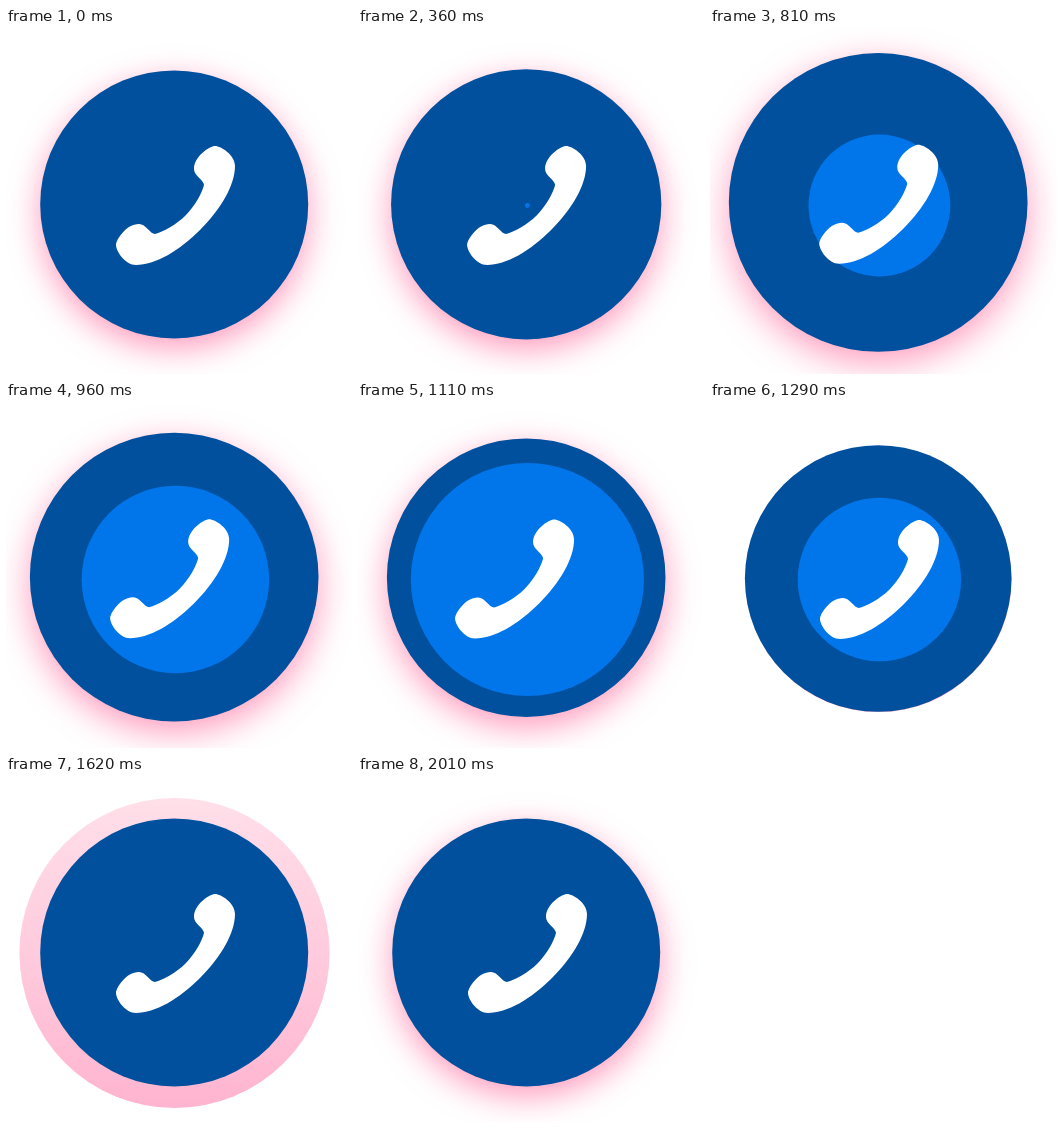
Recreate the animation shown at these times as an HTML page. Size 346 px wide and 346 px high, loop 2400 ms.

```html
<!DOCTYPE html>
<html lang="en">
<head>
<meta charset="utf-8">
<title>Call button</title>
<style>
  html, body { margin: 0; width: 100%; height: 100%; overflow: hidden; background: #fff; }
  svg { display: block; width: 100vw; height: 100vh; }
</style>
</head>
<body>
<svg viewBox="0 0 346 346">
  <defs>
    <filter id="blur" x="-30%" y="-30%" width="160%" height="160%" color-interpolation-filters="sRGB">
      <feGaussianBlur stdDeviation="16"/>
    </filter>
    <linearGradient id="pink" x2="0" y2="1">
      <stop offset="0" stop-color="#ffdfe9"/>
      <stop offset=".5" stop-color="#ffcbdd"/>
      <stop offset="1" stop-color="#ffb4cf"/>
    </linearGradient>
    <clipPath id="reveal"><circle id="revealCircle" cx="168.5" cy="177"/></clipPath>
  </defs>
  <g clip-path="url(#reveal)">
    <g id="shadow">
      <circle cy="10" r="134" fill="#ff508c" fill-opacity=".57" filter="url(#blur)"/>
    </g>
  </g>
  <circle id="ring" cx="168.5" cy="177" fill="url(#pink)"/>
  <circle id="button" cx="168.2" fill="#00509d"/>
  <circle id="ripple" cx="169.4" cy="177.5" fill="#0076ea"/>
  <path id="phone" fill="#fff" d="M209 118C215 118 229 127 229 138C229 157 215 181 194 202
    C173 223 149 237 130 237C119 237 110 223 110 217C110 212 120 196 133 196
    C140 196 144 206 149 206C157 204 170 197 179.5 187.5C189 178 196 165 198 157
    C198 152 188 148 188 141C188 128 204 118 209 118Z"/>
</svg>
<script>
  const LOOP = 2400, REST = 134;
  const PULSE_START = 1290, PULSE_END = 1830;
  const radiusKeys = [[330, REST], [780, 150.4], [1290, 133.3], [1350, REST]];
  const rippleKeys = [[345, 0], [1140, 121], [1605, 0]];
  const shakeKeys = [[330, 0], [570, -7], [840, 0], [1110, -13], [1290, 0]];
  const ringFade = [[1620, 1], [1815, 0]];
  const el = id => document.getElementById(id);
  const [shadow, reveal, ring, button, ripple, phone] =
    ['shadow', 'revealCircle', 'ring', 'button', 'ripple', 'phone'].map(el);

  function tween(keys, t) {
    if (t <= keys[0][0]) return keys[0][1];
    for (let i = 1; i < keys.length; i++) {
      const [t0, a] = keys[i - 1], [t1, b] = keys[i];
      if (t < t1) return a + (b - a) * (t - t0) / (t1 - t0);
    }
    return keys[keys.length - 1][1];
  }

  function draw(t) {
    const radius = tween(radiusKeys, t);
    const lift = (radius - REST) / 8;
    const cy = 176.4 - lift;
    button.setAttribute('r', radius);
    button.setAttribute('cy', cy);
    shadow.setAttribute('transform', `translate(168.2 ${cy}) scale(${radius / REST})`);
    ripple.setAttribute('r', tween(rippleKeys, t));
    phone.setAttribute('transform', `translate(${tween(shakeKeys, t)} ${-lift * .6})`);

    // The glow is cut off, then uncovered by a growing disc.
    const pulsing = t >= PULSE_START && t < PULSE_END;
    const pulse = 133 + (t - PULSE_START) / 15;
    reveal.setAttribute('r', pulsing ? pulse : 400);
    ring.setAttribute('r', pulsing ? pulse : 0);
    ring.setAttribute('opacity', tween(ringFade, t));
  }

  const start = performance.now();
  function tick() {
    draw((performance.now() - start) % LOOP);
    requestAnimationFrame(tick);
  }
  draw(0);
  requestAnimationFrame(tick);
</script>
</body>
</html>
```
